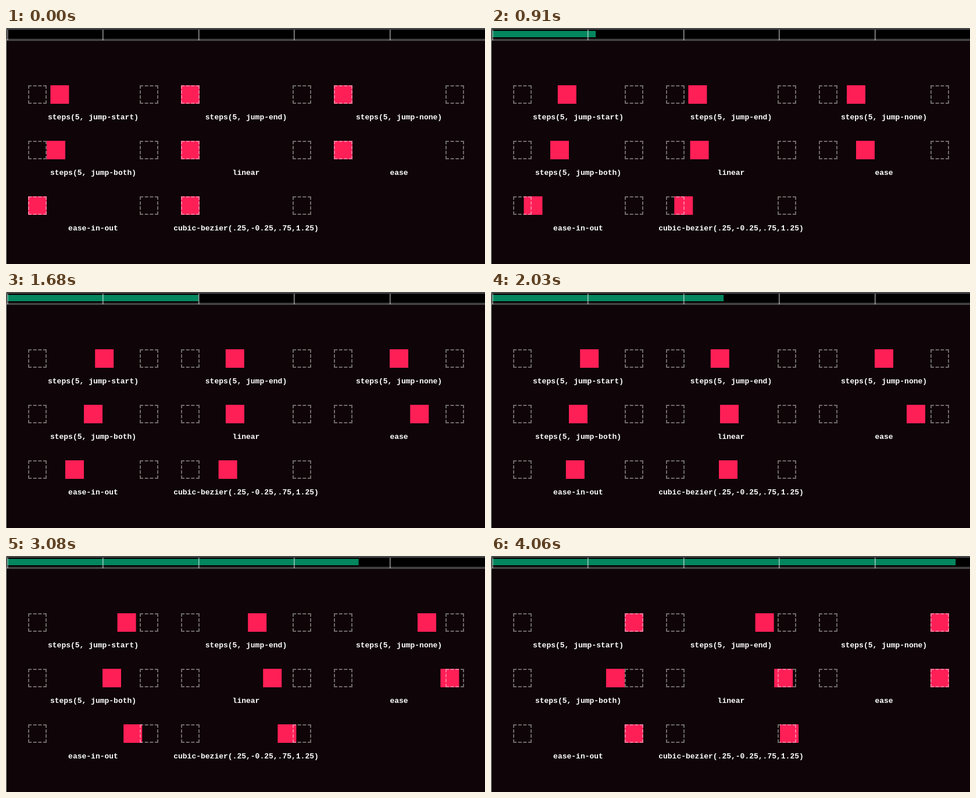
These frames come from a looping animation (824x408 px, 4.13 s). An HTML page:

```html
<!DOCTYPE html>
<html lang="en">
<head>
<meta charset="utf-8">
<title>Easing comparison</title>
<style>
  html, body { margin: 0; width: 100%; height: 100%; overflow: hidden; background: #0f0508; }
  svg { display: block; width: 824px; height: 408px; }
  text { font: bold 13px "Liberation Mono", "Courier New", monospace; fill: #fff; text-anchor: middle; white-space: pre; }
  .slot { fill: none; stroke: #fff; stroke-opacity: .4; stroke-width: 2; stroke-dasharray: 6 2.667; }
  .box { fill: #ff1f57; }
</style>
</head>
<body>
<svg id="stage" viewBox="0 0 824 408"></svg>
<script>
const LOOP = 4130, TICK = 70, DURATION = 4182, DELAY = 4;
const TRAVEL = 192, TRACK_LEFT = 2, TRACK_WIDTH = 822;
const stage = document.getElementById('stage');

function add(parent, tag, attrs, text) {
  const el = document.createElementNS('http://www.w3.org/2000/svg', tag);
  for (const key in attrs) el.setAttribute(key, attrs[key]);
  if (text) el.textContent = text;
  return parent.appendChild(el);
}

function rect(x, y, width, height, fill) {
  return add(stage, 'rect', { x, y, width, height, fill });
}

function bezier(x1, y1, x2, y2) {
  const at = (s, a, b) => 3 * (1 - s) ** 2 * s * a + 3 * (1 - s) * s * s * b + s ** 3;
  return p => {
    let low = 0, high = 1;
    for (let i = 0; i < 30; i++) {
      const mid = (low + high) / 2;
      if (at(mid, x1, x2) < p) low = mid; else high = mid;
    }
    return at(low, y1, y2);
  };
}

// Five equal intervals, with a given first jump and number of jumps.
const steps = (first, jumps) => p => (Math.min(4, Math.floor(p * 5)) + first) / jumps;

const easings = [
  ['steps(5, jump-start)', steps(1, 5)],
  ['steps(5, jump-end)', steps(0, 5)],
  ['steps(5, jump-none)', steps(0, 4)],
  ['steps(5, jump-both)', steps(1, 6)],
  ['linear', p => p],
  ['ease', bezier(.25, .1, .25, 1)],
  ['ease-in-out', bezier(.42, 0, .58, 1)],
  ['cubic-bezier(.25,-0.25,.75,1.25)', bezier(.25, -.25, .75, 1.25)]
];

rect(0, 0, 824, 408, '#0f0508');
rect(0, 0, 824, 22, '#000');
rect(0, 0, 824, 3, '#444');
const bar = rect(TRACK_LEFT, 5, 0, 11, '#04865f');
rect(0, 19, 824, 1, '#777');
rect(0, 21, 824, 1, '#777');
for (let i = 0; i < 5; i++) {
  rect(TRACK_LEFT + Math.round(i * TRACK_WIDTH / 5), 3, 1.5, 18, 'rgba(255,255,255,.6)');
}
rect(0, 0, 1, 408, '#999');

const movers = easings.map(([label, ease], i) => {
  const x = 38 + i % 3 * 263, y = 99 + Math.floor(i / 3) * 96;
  const cell = add(stage, 'g', { transform: `translate(${x} ${y})` });
  const box = add(cell, 'rect', { class: 'box', width: 32, height: 32 });
  for (const left of [0, TRAVEL]) {
    add(cell, 'path', {
      class: 'slot',
      transform: `translate(${left} 0)`,
      d: 'M0 1H32M0 31H32M1 0V32M31 0V32'
    });
  }
  add(cell, 'text', { x: 112, y: 59 }, label);
  return { box, ease };
});

function render(time) {
  const shown = Math.floor(time % LOOP / TICK) * TICK;
  const p = Math.max(0, shown - DELAY) / DURATION;
  bar.setAttribute('width', p * TRACK_WIDTH);
  for (const { box, ease } of movers) box.setAttribute('x', ease(p) * TRAVEL);
}

const start = performance.now();
function frame() {
  render(performance.now() - start);
  requestAnimationFrame(frame);
}
frame();
</script>
</body>
</html>
```
